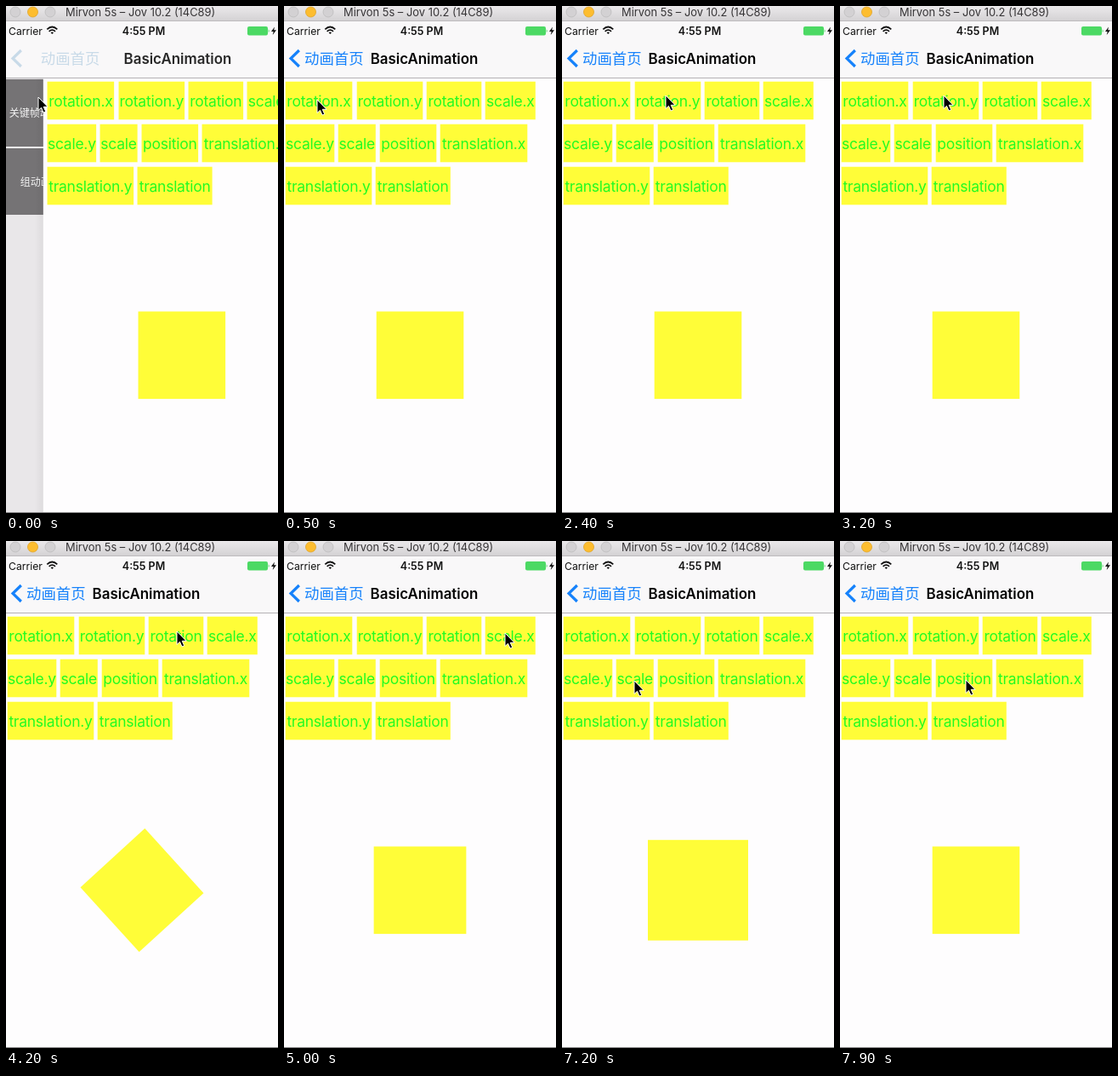
An HTML page for the animation above (8000 ms loop, 320 by 595 pixels).

```html
<!DOCTYPE html>
<html lang="zh">
<head>
<meta charset="utf-8">
<style>
html, body { margin: 0; width: 100%; height: 100%; overflow: hidden; background: #fefdfe; }
svg { display: block; width: 320px; height: 595px; font-family: Inter, "Noto Sans CJK SC", "Noto Sans CJK", sans-serif; }
#buttons text { font-size: 17.5px; letter-spacing: -.25px; fill: #22fb22; text-anchor: middle; }
.yellow { fill: #fffd38; }
</style>
</head>
<body>
<svg viewBox="0 0 320 595">
  <defs>
    <linearGradient id="chrome" x2="0" y2="1">
      <stop stop-color="#ebe9eb"/><stop offset="1" stop-color="#d4d2d4"/>
    </linearGradient>
    <linearGradient id="shade">
      <stop stop-color="#000" stop-opacity="0"/><stop offset="1" stop-color="#000" stop-opacity=".05"/>
    </linearGradient>
  </defs>

  <g id="menu">
    <rect x="-60" y="84" width="380" height="511" fill="#e9e7e9"/>
    <path d="M-60 86H83V165H-60zM-60 167H83V245H-60z" fill="#757375"/>
    <path d="M-60 166H83" stroke="#f4f2f4" stroke-width="2"/>
    <g fill="#f4f4f4" font-size="12" text-anchor="middle">
      <text x="34" y="130">关键帧动画</text>
      <text x="35" y="211">组动画</text>
    </g>
  </g>

  <g id="page">
    <rect x="-13" y="84" width="10" height="511" fill="url(#shade)"/>
    <rect x="-3" y="84" width="330" height="511" fill="#fefdfe"/>
    <g id="buttons"></g>
    <rect id="box" class="yellow" x="-51.300" y="-51.300" width="102.600" height="102.600"/>
  </g>

  <rect y="17" width="320" height="67" fill="#f9f8f9"/>
  <path d="M0 84.500H320" stroke="#b4b2b5"/>
  <rect width="320" height="17" fill="url(#chrome)"/>
  <path d="M0 17.500H320" stroke="#bdbbbd"/>
  <g stroke-width=".8">
    <circle cx="11" cy="7" r="6" fill="#d3d1d3" stroke="#bdbbbd"/>
    <circle cx="31.500" cy="7" r="6" fill="#fdbd2f" stroke="#e0a428"/>
    <circle cx="52" cy="7" r="6" fill="#d3d1d3" stroke="#bdbbbd"/>
  </g>
  <text x="70" y="12" font-size="12.900" fill="#363436">Mirvon 5s – Jov 10.2 (14C89)</text>

  <text x="3" y="33.500" font-size="12.200" fill="#111">Carrier</text>
  <g fill="none" stroke="#111" stroke-width="1.700">
    <path d="M48.300 27.300Q54.300 21.700 60.300 27.300M50.600 29.900Q54.300 26.500 58 29.900"/>
    <path d="M52.600 31.300Q54.300 29.800 56 31.300L54.300 33z" fill="#111" stroke="none"/>
  </g>
  <text x="162" y="33.500" font-size="12.500" font-weight="600" fill="#111" text-anchor="middle">4:55 PM</text>
  <rect x="284" y="24" width="24" height="10.500" rx="2" fill="#4cd964"/>
  <path d="M308.700 27.300q2 2 0 4z" fill="#4cd964"/>
  <path d="M316 24.500L312 30H314.700L313.700 34L318 28.300H315.200z" fill="#111"/>

  <path id="chevron" d="M17.800 52L8 61.500L17.800 71" fill="none" stroke="#1682fb" stroke-width="3.200"/>
  <text id="back" y="67.500" font-size="17.400" fill="#1682fb">动画首页</text>
  <text id="title" y="67.500" font-size="16.900" font-weight="600" fill="#050505" text-anchor="middle">BasicAnimation</text>

  <path d="M0 594.500H320" stroke="#858385"/>
  <path id="cursor" d="M0 0V15.500L3.500 12.300L6 18L8.700 16.800L6.200 11.300H11z" fill="#000" stroke="#fff"/>
</svg>
<script>
const el = id => document.getElementById(id);
const LOOP = 8000, SPAN = 510;

// label, left edge, right edge
const rows = [
  [['rotation.x', 2, 80], ['rotation.y', 86, 163], ['rotation', 168, 232], ['scale.x', 237, 295.5]],
  [['scale.y', 2, 59], ['scale', 64, 107.5], ['position', 113, 179], ['translation.x', 184, 286]],
  [['translation.y', 2, 103], ['translation', 108, 195.5]]
];
const BLEED = .3;
el('buttons').innerHTML = rows.map((row, i) => row.map(([label, a, b]) =>
  `<rect class="yellow" x="${a - BLEED}" y="${89 + 50 * i - BLEED}" width="${b - a + 2 * BLEED}" height="${44 + 2 * BLEED}"/>
   <text x="${(a + b) / 2}" y="${118 + 50 * i}">${label}</text>`).join('')).join('');

// half turn seen edge-on, snapped so that slivers vanish
const flip = p => Math.round(Math.cos(Math.PI * p) * 25) / 25;

// start time and transform for each demo, p runs from 0 to 1
const demos = [
  [1345, p => `scale(1 ${flip(p)})`],
  [2640, p => `scale(${flip(p)} 1)`],
  [4066, p => `rotate(${180 * p})`],
  [4940, p => `scale(${1 + p / 2} 1)`],
  [6185, p => `scale(1 ${1 + p / 2})`],
  [7150, p => `scale(${1 + 1.5 * p})`]
];

// cursor stops: time, x, y
const stops = [
  [0, 38, 107], [500, 39, 110], [1950, 39, 110], [2400, 122, 105], [3400, 122, 105],
  [3850, 201, 106], [4400, 201, 106], [4800, 260, 108], [5350, 260, 108],
  [5700, 77, 132], [6000, 30, 158], [6650, 30, 158], [7050, 85, 164],
  [7500, 85, 164], [7850, 148, 163], [8000, 148, 163]
];

function cursorAt(t) {
  const i = stops.findIndex(s => s[0] > t);
  const [t0, x0, y0] = stops[i - 1], [t1, x1, y1] = stops[i];
  const u = (t - t0) / (t1 - t0), e = u * u * (3 - 2 * u);
  return [x0 + (x1 - x0) * e, y0 + (y1 - y0) * e];
}

// critically damped tail of the page push, 1 at the loop start
const spring = u => (1 + u) * Math.exp(-u);
const pushLeft = t => spring(3.37 + t * .0183) / spring(3.37);

// bar tint: pale grey-blue while pushing, full blue at rest
const PALE = [203, 219, 232], BLUE = [22, 130, 251];
const tint = k => `rgb(${BLUE.map((c, i) => Math.round(c + (PALE[i] - c) * k))})`;

function draw(t) {
  const k = pushLeft(t);
  el('page').setAttribute('transform', `translate(${47.5 * k})`);
  el('menu').setAttribute('transform', `translate(${-14 * (1 - k)})`);
  el('back').setAttribute('x', 24 + 17 * k);
  el('back').setAttribute('fill', tint(k));
  el('chevron').setAttribute('stroke', tint(k));
  el('title').setAttribute('x', 165 + 37.5 * k);
  el('title').setAttribute('opacity', 1 - .15 * k);

  const demo = demos.find(([start]) => t >= start && t < start + SPAN);
  const pose = demo ? demo[1]((t - demo[0]) / SPAN) : '';
  el('box').setAttribute('transform', `translate(160 409.8) ${pose}`);
  el('cursor').setAttribute('transform', `translate(${cursorAt(t)})`);
}

const begin = performance.now();
function tick() {
  draw((performance.now() - begin) % LOOP);
  requestAnimationFrame(tick);
}
tick();
</script>
</body>
</html>
```
